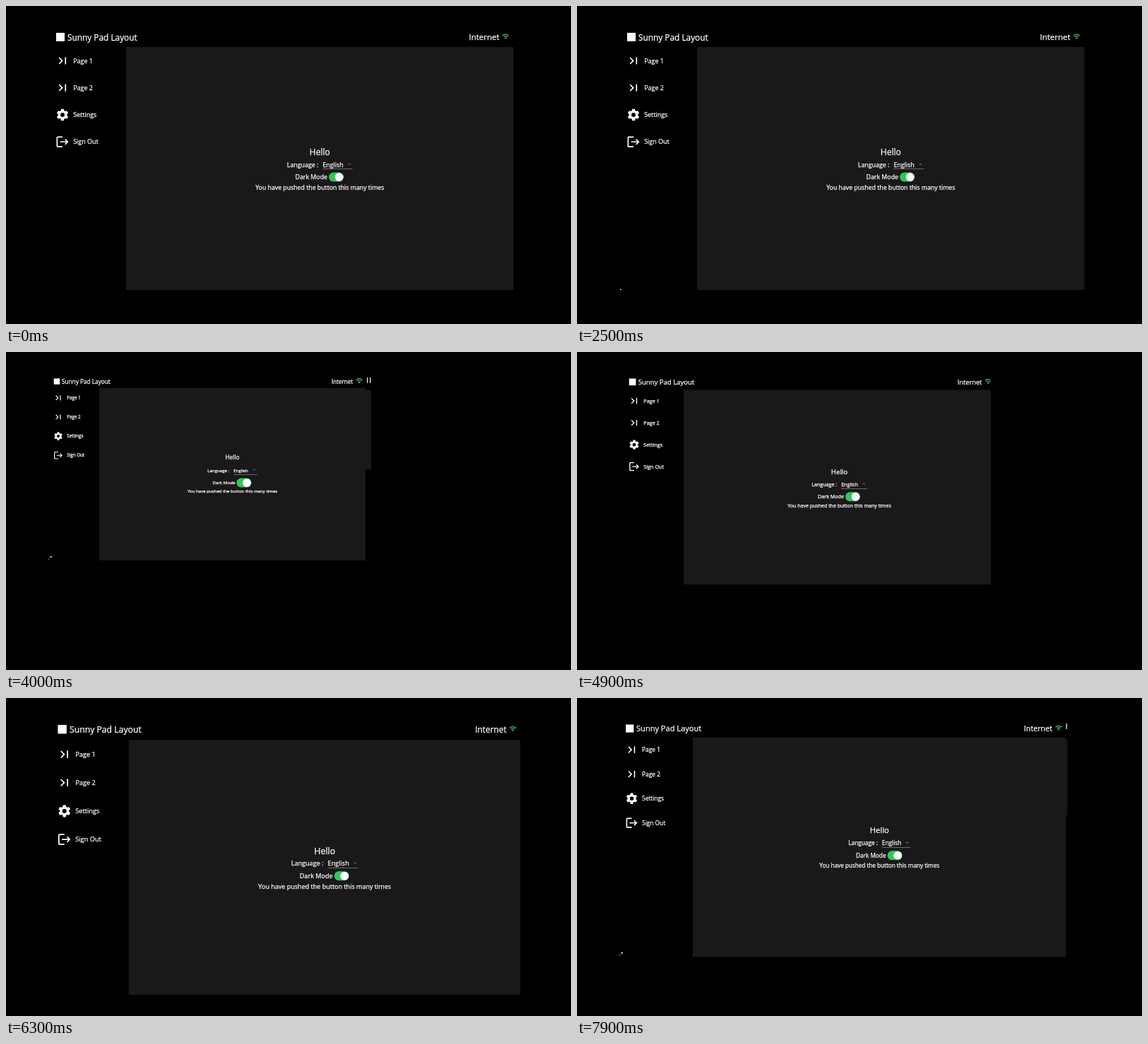
An HTML page with a canvas that plays this animation: 800 by 450 pixels, repeating every 8 s.

```html
<!DOCTYPE html>
<html lang="en">
<head>
<meta charset="utf-8">
<style>
  html, body { margin: 0; width: 800px; height: 450px; overflow: hidden; background: #000; }
  canvas { display: block; }
</style>
</head>
<body>
<canvas id="stage" width="800" height="450"></canvas>
<script>
const ctx = document.getElementById('stage').getContext('2d');
const LOOP = 8000, STEP = 100, TOP = 34;
const PANEL = '#1a181a', WHITE = '#fff', GREEN = '#35c45b';

// Window sizes: step, icon x, panel left, right, bottom, pixels cut off at the right
const KEYS = [
  [28, 80, 170, 718.5, 402, 0],
  [37, 75.5, 142, 566, 320, 0],
  [40, 74, 132, 509, 295, 0],
  [42, 75, 132, 494, 285, 0],
  [46, 80, 147, 568, 318, 6],
  [49, 81, 151, 592, 332, 6],
  [55, 83, 161, 638, 364, 5],
  [57, 84, 165, 662, 380, 4],
  [64, 82.5, 175, 740, 427, 0],
  [70, 82, 179, 770, 443, 0],
  [73, 82, 180, 777, 439, 0],
  [79, 77.5, 164, 692.5, 366, 0]
];

const nextIcon = new Path2D('M5.59 7.41L10.18 12l-4.59 4.59L7 18l6-6-6-6zM16 6h2v12h-2z');
const exitIcon = new Path2D('M17 7l-1.41 1.41L18.17 11H8v2h10.17l-2.58 2.58L17 17l5-5z' +
  'M4 5h8V3H4a2 2 0 0 0-2 2v14a2 2 0 0 0 2 2h8v-2H4z');
const gearIcon = makeGear();
const MENU = [['Page 1', nextIcon], ['Page 2', nextIcon], ['Settings', gearIcon], ['Sign Out', exitIcon]];

function makeGear() {
  const path = new Path2D();
  for (let i = 0; i < 6; i++) {
    const at = (radius, turn) => {
      const a = i * Math.PI / 3 + turn;
      path.lineTo(12 + radius * Math.sin(a), 12 - radius * Math.cos(a));
    };
    at(7.5, -0.36); at(10, -0.23); at(10, 0.23); at(7.5, 0.36);
  }
  path.closePath();
  path.moveTo(15.5, 12);
  path.arc(12, 12, 3.5, 0, 7);
  return path;
}

function layoutAt(step) {
  if (step <= KEYS[0][0]) return KEYS[0].slice(1);
  const i = KEYS.findIndex(key => key[0] >= step);
  const a = KEYS[i - 1], b = KEYS[i];
  const k = (step - a[0]) / (b[0] - a[0]);
  return a.map((v, n) => v + (b[n] - v) * k).slice(1);
}

function setFont(size) { ctx.font = `${size}px "Open Sans", "Noto Sans", sans-serif`; }

// A hairline stroke gives the slightly heavier strokes of light-on-dark UI text
function text(str, x, y, size, align = 'left') {
  setFont(size);
  ctx.textAlign = align;
  ctx.fillStyle = ctx.strokeStyle = WHITE;
  ctx.lineWidth = 0.25;
  ctx.fillText(str, x, y + size * 0.35);
  ctx.strokeText(str, x, y + size * 0.35);
}

function width(str, size) {
  setFont(size);
  return ctx.measureText(str).width;
}

function rect(x, y, w, h, color) {
  ctx.fillStyle = color;
  ctx.fillRect(x, y, w, h);
}

function circle(x, y, r, color) {
  ctx.fillStyle = color;
  ctx.beginPath();
  ctx.arc(x, y, r, 0, 7);
  ctx.fill();
}

function icon(path, x, y, scale) {
  ctx.save();
  ctx.translate(x, y);
  ctx.scale(scale, scale);
  ctx.translate(-12, -12);
  ctx.fillStyle = WHITE;
  ctx.fill(path, 'evenodd');
  ctx.restore();
}

function wifi(x, y) {
  ctx.strokeStyle = '#4fb765';
  ctx.lineWidth = 1.2;
  for (const r of [6.3, 3.8]) {
    ctx.beginPath();
    ctx.arc(x, y + 3, r, -Math.PI * 0.76, -Math.PI * 0.24);
    ctx.stroke();
  }
  circle(x, y + 2, 1.2, '#4fb765');
}

function header(iconX, right, y, u) {
  const wifiX = right - 4 - 7 * u;
  rect(iconX - 9 * u, y - 6.5 * u, 12 * u, 12 * u, WHITE);
  text('Sunny Pad Layout', iconX + 7 * u, y, 11.85 * u);
  text('Internet', wifiX - 9, y, 11.5 * u, 'right');
  wifi(wifiX, y - 1);
}

function form(cx, cy, u) {
  const size = 8.85 * u;
  text('Hello', cx, cy - 23.5, 12 * u, 'center');

  const labelW = width('Language :', size), valueW = width('English', size);
  const left = cx - (labelW + 6 + valueW + 13) / 2, valueX = left + labelW + 6;
  text('Language :', left, cy - 5.5, size);
  text('English', valueX, cy - 5.5, size);
  rect(valueX, Math.round(cy), valueW + 13, 1, '#6b6a6b');
  const arrowX = valueX + valueW + 8.5;
  ctx.fillStyle = '#626062';
  ctx.beginPath();
  ctx.moveTo(arrowX - 2.3, cy - 7);
  ctx.lineTo(arrowX + 2.3, cy - 7);
  ctx.lineTo(arrowX, cy - 4.7);
  ctx.fill();

  const modeW = width('Dark Mode', size);
  const modeX = cx - 0.5 - (modeW + 23) / 2, toggleX = modeX + modeW + 2;
  text('Dark Mode', modeX, cy + 12.2, size);
  ctx.fillStyle = GREEN;
  ctx.beginPath();
  ctx.roundRect(toggleX, cy + 5.5, 21, 13, 6.5);
  ctx.fill();
  circle(toggleX + 14.6, cy + 12, 5.9, WHITE);

  text('You have pushed the button this many times', cx, cy + 15 + 12 * u, 8.75 * u, 'center');
}

// Leftover strip beside the panel while the window shrinks
function staleEdge(right, panelY, lag) {
  rect(right, panelY + 3, lag, 163 - panelY, PANEL);
  rect(right + lag - 2, 36, 1.4, 8, '#ddd');
  if (lag > 4) rect(right + lag - 6, 36, 1.4, 8, '#ddd');
}

function resizeCursor(x, y) {
  ctx.strokeStyle = WHITE;
  ctx.lineWidth = 0.8;
  ctx.setLineDash([1.5, 1]);
  ctx.beginPath();
  ctx.moveTo(x - 2.5, y + 2.5);
  ctx.lineTo(x + 2, y - 2);
  ctx.stroke();
  ctx.setLineDash([]);
  rect(x + 0.5, y - 2.5, 2, 1, WHITE);
  rect(x + 1.5, y - 2.5, 1, 2, WHITE);
}

function isShrinking(step) { return (step >= 29 && step <= 42) || step >= 74; }

function pointer(step, bottom) {
  if (step === 11) {
    ctx.fillStyle = WHITE;
    ctx.beginPath();
    ctx.moveTo(72, 366);
    ctx.lineTo(77, 371);
    ctx.lineTo(72, 373);
    ctx.fill();
  } else if (step === 16 || step === 19) {
    rect(60, 400, 4, 1.5, '#ddd');
  } else if (step === 25 || (step >= 66 && step <= 73)) {
    rect(61, Math.round(bottom) - 1.5, 1.5, 1.5, WHITE);
  } else if (isShrinking(step)) {
    resizeCursor(62, bottom - 3.5);
  }
}

function draw(step) {
  const [iconX, left, right, bottom, cut] = layoutAt(step);
  const w = right - left, h = (bottom - TOP) / 1.07;
  const panelY = bottom - h;
  const u = (w / 548 + h / 344) / 2;

  rect(0, 0, 800, 450, '#000');
  ctx.save();
  ctx.beginPath();
  ctx.rect(0, 0, right - cut + 10 * !cut, bottom - cut / 2);
  ctx.clip();
  rect(left, panelY, w, h, PANEL);
  header(iconX, right, TOP + 2 + h * 0.0245, u);
  MENU.forEach(([label, path], i) => {
    const y = panelY + h * (0.0565 + 0.1112 * i);
    icon(path, iconX, y, 0.85 * u);
    text(label, iconX + 5.5 + 9.7 * u, y, 8.95 * u);
  });
  form((left + right) / 2, panelY + h / 2, u);
  if (isShrinking(step)) staleEdge(right, panelY, step % 2 ? 2 : 8);
  ctx.restore();
  pointer(step, bottom);
}

function tick() {
  draw(Math.floor(performance.now() % LOOP / STEP));
  requestAnimationFrame(tick);
}
tick();
</script>
</body>
</html>
```
